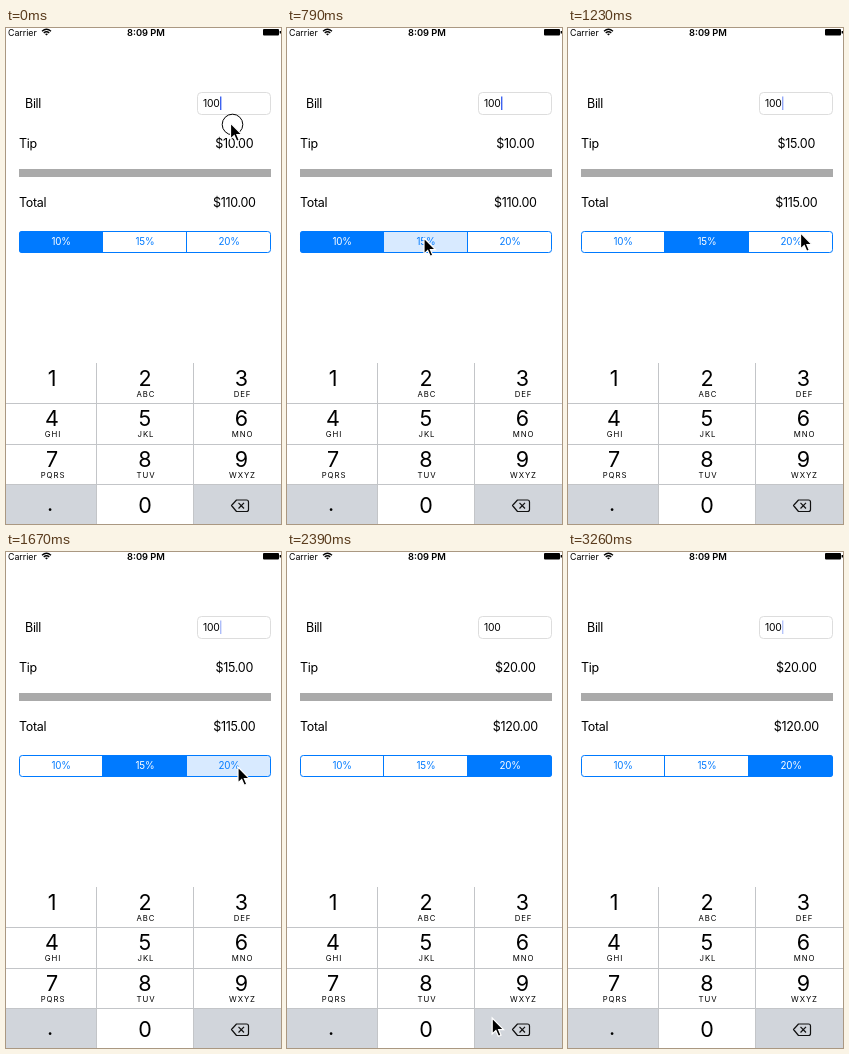
Animation of 275 by 496 pixels, one loop 3360 ms. Source, as an HTML page:

```html
<!DOCTYPE html>
<html lang="en">
<head>
<meta charset="utf-8">
<title>Tip calculator</title>
<style>
  html, body { margin: 0; width: 100%; height: 100%; overflow: hidden; background: #fff; }
  svg { display: block; width: 275px; height: 496px; font-family: Inter, Roboto, sans-serif; }
  .label { font-size: 12.5px; letter-spacing: -.3px; }
  .mid { text-anchor: middle; }
  .digit { font-size: 21.5px; }
  .letters { font-size: 7.8px; letter-spacing: .9px; }
  .seg text { font-size: 9.8px; letter-spacing: -.2px; fill: #007aff; }
  .seg rect { fill: #fff; }
  .seg.pressed rect { fill: #d8eaff; }
  .seg.on rect { fill: #007aff; }
  .seg.on text { fill: #fff; }
</style>
</head>
<body>
<svg viewBox="0 0 275 496">
  <defs><clipPath id="round"><rect x="13" y="203" width="252" height="22" rx="3"/></clipPath></defs>

  <!-- status bar -->
  <text x="2" y="7.5" font-size="8.8">Carrier</text>
  <g fill="none" stroke="#000" stroke-width="1.3">
    <path d="M36 3.2Q40.500 -.8 45 3.200M37.700 5Q40.500 2.500 43.300 5"/>
    <path d="M40.500 7.600L39 6.100Q40.500 4.900 42 6.100Z" fill="#000" stroke="none"/>
  </g>
  <text class="mid" x="140" y="7.600" font-size="9.300" font-weight="600">8:09 PM</text>
  <rect x="257" y="1" width="16" height="6.500" rx="1"/>
  <rect x="273.600" y="3" width="1.400" height="2.500"/>

  <!-- form -->
  <g class="label">
    <text x="19" y="79.500">Bill</text>
    <text x="13" y="120">Tip</text>
    <text x="13" y="179">Total</text>
    <text id="tip" class="mid" x="228.300" y="120"></text>
    <text id="total" class="mid" x="228.300" y="179"></text>
  </g>
  <rect x="191.500" y="64.500" width="73" height="22" rx="4" fill="#fff" stroke="#ddd"/>
  <text x="197" y="79" font-size="10.300" letter-spacing="-.2">100</text>
  <rect id="caret" x="214" y="68.500" width="1.400" height="13.500" fill="#3d62f0"/>
  <rect x="13" y="141" width="252" height="8" fill="#aaa"/>

  <g id="segs" clip-path="url(#round)"></g>
  <g fill="none" stroke="#007aff">
    <rect x="13.500" y="203.500" width="251" height="21" rx="2.800"/>
    <path d="M96.500 203V225M180.500 203V225"/>
  </g>

  <!-- keypad -->
  <path d="M0 457H90V496H0ZM188 457H275V496H188Z" fill="#d1d5db"/>
  <path d="M0 375.500H275M0 416.500H275M0 456.500H275M90.500 335V496M187.500 335V496" stroke="#c3c5c8" fill="none"/>
  <g id="keys"></g>
  <g fill="none" stroke="#111" stroke-width="1.200" stroke-linejoin="round">
    <path d="M225.500 477.500L230.500 472H240.500Q242.500 472 242.500 474V481.500Q242.500 483.500 240.500 483.500H230.500Z"/>
    <path d="M232.500 474.800L238 480.500M238 474.800L232.500 480.500"/>
  </g>

  <!-- pointer -->
  <circle id="ring" cx="226.500" cy="96.500" r="10.300" fill="none" stroke="#000"/>
  <path id="arrow" d="M0 0V16L3.700 12.600L6.200 18.300L8.800 17.200L6.400 11.600H11.400Z" stroke="#fff" stroke-width="1.200"/>
</svg>
<script>
  const SVG = 'http://www.w3.org/2000/svg';
  const LOOP = 3360, STEP = 88.3, LAST = 37;
  const RATES = [10, 15, 20], BILL = 100;
  const $ = id => document.getElementById(id);

  function add(parent, tag, attrs, text = '') {
    const el = document.createElementNS(SVG, tag);
    for (const name in attrs) el.setAttribute(name, attrs[name]);
    el.textContent = text;
    return parent.appendChild(el);
  }

  const segs = RATES.map((rate, i) => {
    const g = add($('segs'), 'g', { class: 'seg' });
    add(g, 'rect', { x: 13 + 84 * i, y: 203, width: 84, height: 22 });
    add(g, 'text', { class: 'mid', x: 55 + 84 * i, y: 217.3 }, rate + '%');
    return g;
  });

  const groups = ['', 'ABC', 'DEF', 'GHI', 'JKL', 'MNO', 'PQRS', 'TUV', 'WXYZ'];
  const columns = [46, 139, 235.5];
  groups.forEach((letters, i) => {
    const x = columns[i % 3], y = 357.5 + 40.5 * Math.floor(i / 3);
    add($('keys'), 'text', { class: 'mid digit', x, y }, i + 1);
    add($('keys'), 'text', { class: 'mid letters', x: x + 1, y: y + 11.2 }, letters);
  });
  add($('keys'), 'text', { class: 'mid digit', x: 139, y: 484.5 }, '0');
  add($('keys'), 'text', { class: 'mid digit', x: 44, y: 483 }, '.');

  // Pointer tip: time, x, y
  const path = [
    [0, 224.5, 95], [90, 196, 142], [180, 150, 200], [270, 115, 227], [360, 105, 230],
    [450, 111, 222], [530, 126, 213], [620, 137, 210], [970, 137, 210], [1060, 174, 207],
    [1140, 219, 204], [1230, 232.5, 204.5], [1320, 233, 211], [1410, 232, 215],
    [2120, 232, 215], [2210, 229, 238], [2300, 215, 352], [2390, 204.5, 474], [2470, 203, 510]
  ];

  function tipAt(t) {
    const i = path.findIndex(p => p[0] > t);
    if (i < 0) return path[path.length - 1].slice(1);
    const [t0, x0, y0] = path[i - 1], [t1, x1, y1] = path[i];
    const k = (t - t0) / (t1 - t0);
    return [x0 + (x1 - x0) * k, y0 + (y1 - y0) * k];
  }

  const clamp = v => Math.max(0, Math.min(1, v));

  function caretAt(t) {
    const p = t % 1000;
    return p < 480 ? clamp((330 - p) / 170) : clamp((p - 640) / 90);
  }

  function draw(now) {
    const frame = Math.min(LAST, Math.floor((now % LOOP + 10) / STEP));
    const t = frame * STEP;
    const chosen = frame < 11 ? 0 : frame < 21 ? 1 : 2;
    const pressed = frame >= 8 && frame < 11 ? 1 : frame >= 18 && frame < 21 ? 2 : -1;
    const tip = BILL * RATES[chosen] / 100;

    segs.forEach((g, i) => {
      g.setAttribute('class', 'seg' + (i === chosen ? ' on' : i === pressed ? ' pressed' : ''));
    });
    $('tip').textContent = '$' + tip.toFixed(2);
    $('total').textContent = '$' + (BILL + tip).toFixed(2);
    $('caret').setAttribute('opacity', caretAt(t));
    $('ring').setAttribute('opacity', frame ? 0 : 1);
    $('arrow').setAttribute('transform', `translate(${tipAt(t)})`);
  }

  const start = performance.now();
  function tick() {
    draw(performance.now() - start);
    requestAnimationFrame(tick);
  }
  tick();
</script>
</body>
</html>
```
